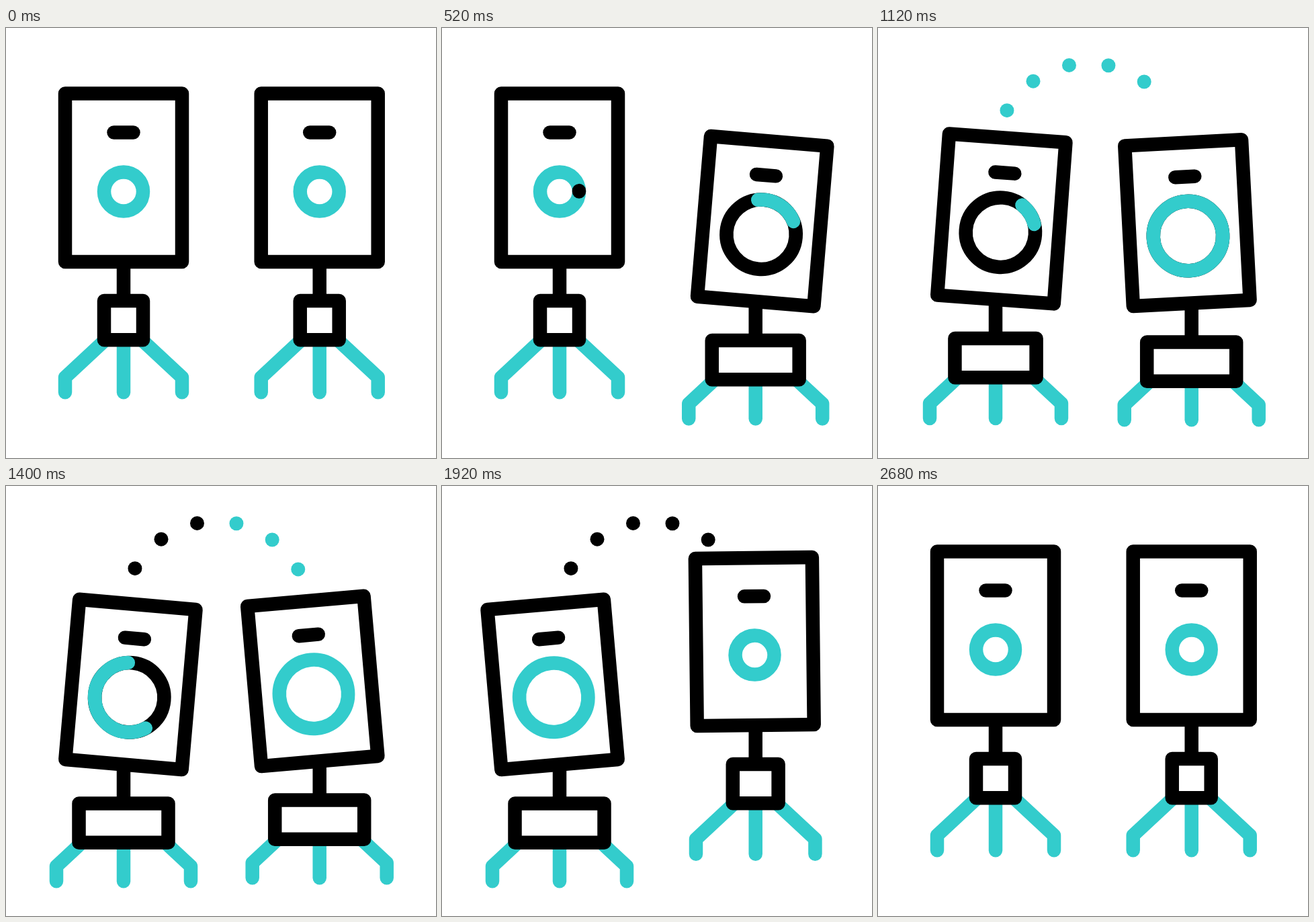
Recreate the animation shown at these times as an HTML page with a canvas. Size 640 by 640 pixels, loop 2.8 s.

```html
<!DOCTYPE html>
<html lang="en">
<head>
<meta charset="utf-8">
<title>Speakers</title>
<style>
  html, body { margin: 0; width: 100%; height: 100%; overflow: hidden; background: #fff; }
  canvas { display: block; width: 100vmin; height: 100vmin; }
</style>
</head>
<body>
<canvas id="stage" width="640" height="640"></canvas>
<script>
const ctx = document.getElementById('stage').getContext('2d');
const LOOP = 2800, STEP = 40, REST = 2680;
const BLACK = '#000', TEAL = '#33cccc', LINE = 20.5;
const RAD = Math.PI / 180;

// Each pair is the start and end of one move, in ms.
const speakers = [
  {
    x: 175, drop: 66.5, footDrop: 46, spin: 170,
    down: [750, 1250], up: [1938, 2438],
    swing: [1417, 1917], settle: [2052, 2552],
    ink: [500, 860], grow: [800, 1100], fill: [944, 1780], shrink: [1873, 2373]
  },
  {
    x: 466.7, drop: 61.5, footDrop: 41, spin: 131,
    down: [85, 585], up: [1538, 2038],
    swing: [767, 1267], settle: [1538, 2038],
    ink: [0, 240], grow: [80, 320], fill: [335, 955], shrink: [1352, 1852]
  }
];

const arc = { x: 313, y: 192, r: 139.5, from: -84.4, to: 90, gap: 24.2,
  show: [800, 1280], ink: [1180, 1660], hide: [2000, 2800] };

function ease(t, [a, b]) {
  const u = Math.min(1, Math.max(0, (t - a) / (b - a)));
  return (1 - Math.cos(Math.PI * u)) / 2;
}

function line(color, ...pts) {
  ctx.strokeStyle = color;
  ctx.beginPath();
  for (let i = 0; i < pts.length; i += 2) ctx.lineTo(pts[i], pts[i + 1]);
  ctx.stroke();
}

function panel(x, y, w, h) {
  ctx.fillStyle = '#fff';
  ctx.strokeStyle = BLACK;
  ctx.beginPath();
  ctx.rect(x, y, w, h);
  ctx.fill();
  ctx.stroke();
}

// Arc drawn counterclockwise from a start angle.
function ring(color, y, r, part, start = 0) {
  if (part <= 0) return;
  ctx.strokeStyle = color;
  ctx.beginPath();
  if (part >= 1) ctx.arc(0, y, r, 0, 2 * Math.PI);
  else ctx.arc(0, y, r, start * RAD, (start - 360 * part) * RAD, true);
  ctx.stroke();
}

function drawStand(s, t) {
  const p = ease(t, s.down) - ease(t, s.up);
  const drop = s.drop * p, foot = s.footDrop * p;
  const spread = 87 + 13 * p, half = 29 + 37.5 * p;
  const bend = 520 + foot, end = 542.3 + foot, top = 406 + drop;
  for (const side of [-1, 1]) {
    const x = s.x + side * spread;
    line(TEAL, s.x + side * (spread - 58), bend - 54, x, bend, x, end);
  }
  line(TEAL, s.x, top + 58, s.x, end);
  line(BLACK, s.x, 348 + drop, s.x, top);
  panel(s.x - half, top, half * 2, 58.3);
}

function drawCard(s, t) {
  const p = ease(t, s.down) - ease(t, s.up);
  const tilt = 5 * ease(t, s.down) - 10 * ease(t, s.swing) + 5 * ease(t, s.settle);
  const shrink = ease(t, s.shrink);
  const size = ease(t, s.grow) - shrink;
  const ink = ease(t, s.ink), fill = ease(t, s.fill);
  const h = 250.5 - 11.5 * p, slot = -192.5 + 4.2 * p;
  const cy = -104.5 + 4.4 * size, r = 29 + 22.7 * size;

  ctx.save();
  ctx.translate(s.x, 348 + s.drop * p);
  ctx.rotate(tilt * RAD);
  panel(-87, -h, 174, h);
  line(BLACK, -14.5, slot, 14.5, slot);
  if (ink < 1 || shrink > 0) ring(TEAL, cy, r, 1);
  if (shrink === 0) {
    ring(BLACK, cy, r, ink);
    ring(TEAL, cy, r, fill, -s.spin * fill);
  }
  ctx.restore();
}

function drawDots(t) {
  const span = arc.to - arc.from;
  const at = move => arc.from + span * ease(t, move);
  const start = at(arc.hide), shown = at(arc.show), inked = at(arc.ink);
  if (shown <= arc.from) return;
  for (let a = start; a <= shown; a += arc.gap) {
    ctx.fillStyle = a <= inked && inked > arc.from ? BLACK : TEAL;
    ctx.beginPath();
    ctx.arc(arc.x + arc.r * Math.sin(a * RAD), arc.y - arc.r * Math.cos(a * RAD), 10.5, 0, 2 * Math.PI);
    ctx.fill();
  }
}

function draw(ms) {
  let t = Math.floor((ms % LOOP) / STEP) * STEP;
  if (t >= REST) t = 0;
  ctx.fillStyle = '#fff';
  ctx.fillRect(0, 0, 640, 640);
  ctx.lineWidth = LINE;
  ctx.lineCap = ctx.lineJoin = 'round';
  speakers.forEach(s => drawStand(s, t));
  drawDots(t);
  speakers.forEach(s => drawCard(s, t));
}

const began = performance.now();
function tick() {
  draw(performance.now() - began);
  requestAnimationFrame(tick);
}
tick();
</script>
</body>
</html>
```
